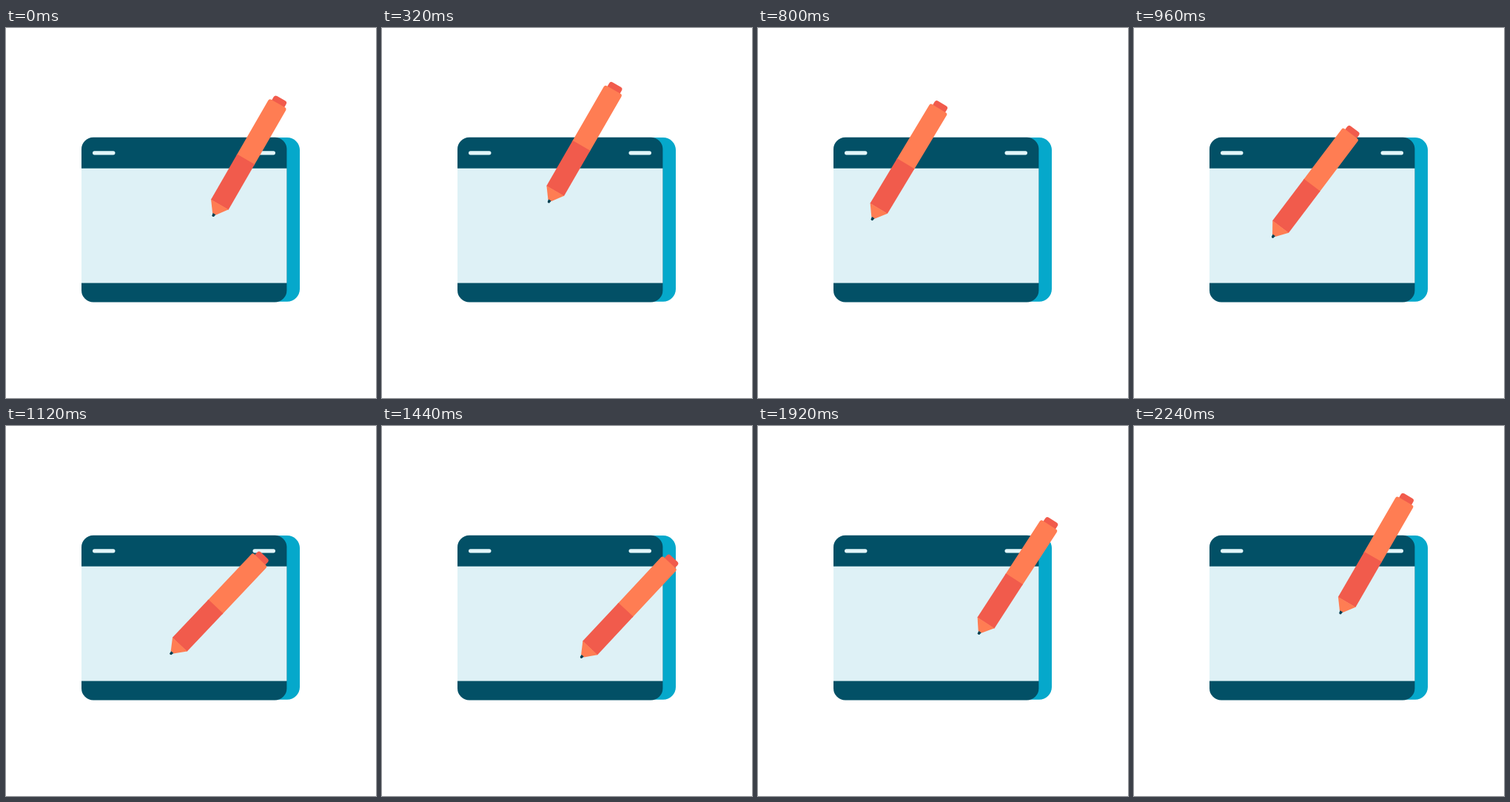
An HTML page that plays this animation: 500 px wide and 500 px high, repeating every 3.24 s.

```html
<!DOCTYPE html>
<html lang="en">
<head>
<meta charset="utf-8">
<title>Pen over a tablet</title>
<style>
  html, body { margin: 0; width: 100%; height: 100%; overflow: hidden; background: #fff; }
  svg { display: block; width: 100%; height: 100%; }
</style>
</head>
<body>
<svg viewBox="0 0 500 500">
  <clipPath id="panel"><rect x="102" y="147.8" width="277.4" height="222.6" rx="16"/></clipPath>
  <rect x="120" y="148" width="277" height="221.8" rx="17" fill="#05a8cb"/>
  <g clip-path="url(#panel)">
    <rect x="102" y="147" width="278" height="224" fill="#025066"/>
    <rect x="102" y="189.7" width="278" height="154.9" fill="#def1f6"/>
  </g>
  <g fill="#e2f6fa">
    <rect x="117" y="166.2" width="30.5" height="5.2" rx="2.6"/>
    <rect x="333.5" y="166.2" width="30.5" height="5.2" rx="2.6"/>
  </g>
  <!-- The pen points down, with its tip at the origin. -->
  <g id="pen">
    <rect x="-10" y="-185" width="19.6" height="16" rx="3.5" fill="#f15b4c"/>
    <path d="M-14-88V-174q0-3 3-3H10.3q3 0 3 3V-88Z" fill="#ff7d53"/>
    <path d="M-14-90H13.3V-19H-14Z" fill="#f15b4c"/>
    <path d="M-14-19.4H13.3L2-4.4H-3Z" fill="#ff7d53"/>
    <path d="M-2.6-4.8H1.6L1-1.2Q-.5 .4-2-1.2Z" fill="#033f50"/>
  </g>
</svg>
<script>
  const STEP = 80, LAST = 2240, LOOP = 3240, CYCLE = 2200;
  const home = { x: 279.5, y: 255.5 }, left = { x: 148, y: 256.5 }, low = { x: 230.4, y: 315.5 };
  const point = (x, y) => ({ x, y });

  // Three eased strokes, each along a cubic Bezier curve
  const strokes = [
    { from: 0, to: 720, tilt: [30, 30], curve: [home, point(236, 230), point(192, 230), left] },
    { from: 720, to: 1220, tilt: [30, 45], curve: [left, point(175.5, 276), point(203, 296), low] },
    { from: 1220, to: CYCLE, tilt: [45, 30], curve: [low, point(347.5, 312.5), point(311.5, 310.5), home] }
  ];
  const pen = document.getElementById('pen');

  const mix = (a, b, p) => a + (b - a) * p;
  const ease = p => p * p * (3 - 2 * p);

  function along(points, p) {
    if (points.length === 1) return points[0];
    const inner = points.slice(1).map((b, i) =>
      point(mix(points[i].x, b.x, p), mix(points[i].y, b.y, p)));
    return along(inner, p);
  }

  const start = performance.now();

  function draw(now) {
    const time = Math.max(0, now - start) % LOOP;
    const t = Math.min(LAST, Math.floor(time / STEP) * STEP) % CYCLE;
    const { from, to, tilt, curve } = strokes.find(s => t < s.to);
    const p = ease((t - from) / (to - from));
    const { x, y } = along(curve, p);
    pen.setAttribute('transform', `translate(${x} ${y}) rotate(${mix(...tilt, p)})`);
    requestAnimationFrame(draw);
  }
  draw(start);
</script>
</body>
</html>
```
